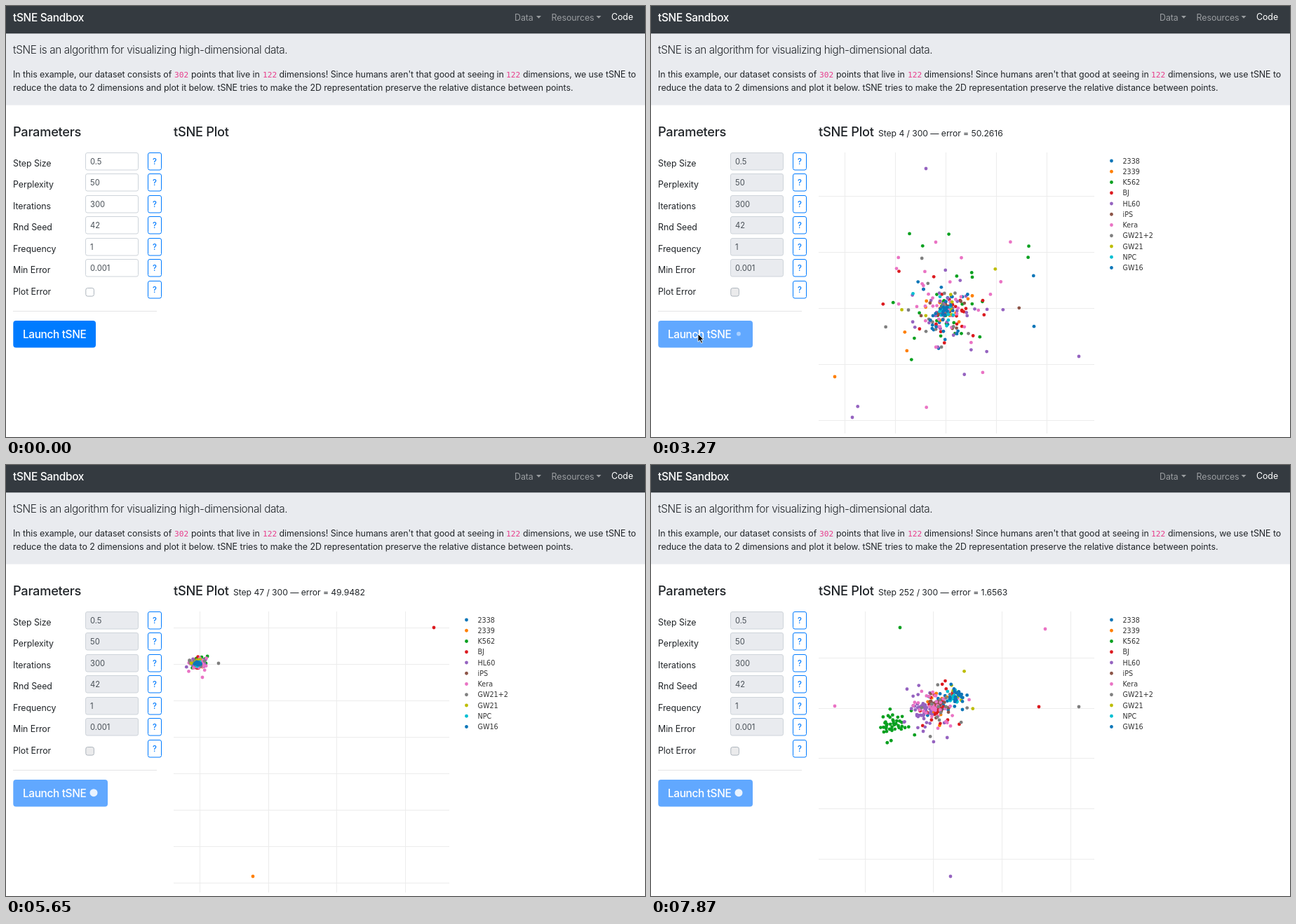
An HTML page that plays this animation: 911 by 615 pixels, repeating every 8 s.

```html
<!DOCTYPE html>
<html lang="en">
<head>
<meta charset="utf-8">
<title>tSNE Sandbox</title>
<style>
  html, body { margin: 0; width: 100%; height: 100%; overflow: hidden; background: #fff; }
  svg { display: block; }
  text { font: 400 12.4px Inter, sans-serif; letter-spacing: -.06px; fill: #212529; white-space: pre; }
  .brand { font-size: 15.4px; font-weight: 500; letter-spacing: -.3px; fill: #fff; }
  .nav { fill: #9a9da0; }
  .active { fill: #fff; }
  .lead { font-size: 15.3px; font-weight: 350; letter-spacing: -.36px; }
  .code { font: 11.2px "DejaVu Sans Mono", monospace; letter-spacing: 0; fill: #e83e8c; }
  .title { font-size: 18.3px; font-weight: 500; letter-spacing: -.3px; }
  .value { font-size: 11.2px; letter-spacing: 0; fill: #495057; }
  .help { font-size: 11.2px; font-weight: 500; fill: #007bff; text-anchor: middle; }
  .launch { font-size: 15.4px; font-weight: 500; letter-spacing: -.36px; fill: #fff; }
  .loading { font-size: 15.4px; letter-spacing: -.4px; }
  .status { font-size: 12.2px; }
  .legend { font: 9.6px "DejaVu Sans", sans-serif; letter-spacing: 0; fill: #333; }
</style>
</head>
<body>
<svg id="stage" width="911" height="615" viewBox="0 0 911 615"></svg>
<script>
const LOOP = 8000;
// spread: how far a group scatters; along: its place on the line of separated clusters
const GROUPS = [
  { name: '2338', color: '#0d76b8', size: 22, spread: .6, along: .75 },
  { name: '2339', color: '#ff7f00', size: 17, spread: 1, along: .7 },
  { name: 'K562', color: '#08a01f', size: 42, spread: 1, along: 0 },
  { name: 'BJ', color: '#dc1a1f', size: 37, spread: 1.1, along: .7 },
  { name: 'HL60', color: '#9563c0', size: 54, spread: 1, along: .45 },
  { name: 'iPS', color: '#8d5548', size: 24, spread: .6, along: .7 },
  { name: 'Kera', color: '#ea73c4', size: 40, spread: 1.3, along: .66 },
  { name: 'GW21+2', color: '#7f7f7f', size: 17, spread: 1.3, along: .8 },
  { name: 'GW21', color: '#bdbd00', size: 8, spread: .8, along: 1 },
  { name: 'NPC', color: '#00bfd2', size: 15, spread: .4, along: .95 },
  { name: 'GW16', color: '#0d76b8', size: 26, spread: .5, along: 1 }
];
const PARAMS = [['Step Size', '0.5'], ['Perplexity', '50'], ['Iterations', '300'], ['Rnd Seed', '42'],
  ['Frequency', '1'], ['Min Error', '0.001'], ['Plot Error']];

// ---- Random helpers ----
let seed = 42;
function random() {
  seed = (seed + 0x6D2B79F5) | 0;
  let r = Math.imul(seed ^ seed >>> 15, 1 | seed);
  r = r + Math.imul(r ^ r >>> 7, 61 | r) ^ r;
  return ((r ^ r >>> 14) >>> 0) / 4294967296;
}
function gauss() {
  const g = Math.sqrt(-2 * Math.log(random() + 1e-9)) * Math.cos(2 * Math.PI * random());
  return Math.max(-2.2, Math.min(2.2, g));
}
const lerp = (a, b, k) => a + (b - a) * k;
const soften = v => 165 * Math.tanh(v / 165);

// A cloud scatters every group around one centre; tail > 0 throws some points far out.
const cloud = (cx, cy, sx, sy, tail) => ({ spread }) => {
  const reach = spread * Math.exp(tail * gauss());
  return [cx + soften(sx * reach * gauss()), cy + soften(sy * reach * gauss())];
};
const separated = group =>
  cloud(lerp(347, 435, group.along), lerp(370, 331, group.along), 11, 11, .35)(group);

// The outermost points, which set the scale of the plot, are given as [group, x, y].
const layout = (scatter, outermost = []) => GROUPS.flatMap((group, g) => {
  const far = outermost.filter(point => point[0] === g).map(([, x, y]) => [x, y]);
  return Array.from({ length: group.size }, (_, i) => far[i] || scatter(group));
});

// grid: a vertical line, gap, a horizontal line, gap
const SCENES = [
  { tick: 7, step: 0, error: 50.2741, grid: [276, 72.2, 271, 80],
    points: layout(cloud(436, 410, 62, 68, 0)) },
  { tick: 11, step: 4, error: 50.2616, grid: [276, 72.2, 271, 80],
    points: layout(cloud(421, 433, 18, 18, 1), [[4, 392, 232], [4, 610, 500], [4, 287, 587], [1, 262, 529]]) },
  { tick: 20, step: 27, error: 49.9698, grid: [276.5, 58, 228, 65.9],
    points: layout(cloud(392, 559, 25, 5, .5), [[1, 390, 232], [1, 286, 587], [3, 597, 558], [6, 610, 582], [6, 262, 564]]) },
  { tick: 27, step: 47, error: 49.9482, grid: [276.5, 97.5, 232, 52],
    points: layout(cloud(274, 283, 4, 3, .3), [[1, 352, 587], [3, 610, 232], [6, 280, 303], [7, 303, 283]]) },
  { tick: 32, step: 61, error: 50.0016, grid: [314.5, 84.3, 228, 40.4],
    points: layout(cloud(313, 431, 4, 13, .6), [[1, 262, 399], [3, 610, 232], [6, 319, 587], [6, 313, 259], [7, 366, 425]]) },
  { tick: 42, step: 252, error: 1.6563, grid: [305, 97.8, 275.5, 71.7],
    points: layout(separated, [[2, 355, 232], [3, 553, 345], [4, 427, 587], [6, 562, 234], [6, 262, 344], [7, 610, 345]]) }
];

// ---- Page markup ----
const text = (x, y, content, cls = '') => `<text x="${x}" y="${y}" class="${cls}">${content}</text>`;
const caret = x => `<path d="M${x} 14h7l-3.5 3.8z" fill="#9a9da0"/>`;
const paramRow = ([name, value], i) => {
  const y = Math.floor(209 + 30.5 * i) + .5;
  const field = value
    ? `<rect class="field" x="113.5" y="${y}" width="75" height="24.5" rx="2.5" stroke="#ced4da"/>` +
      text(120, y + 16.8, value, 'value')
    : `<rect id="check" x="113.8" y="${y + 10}" width="11.6" height="11.6" rx="2.6" stroke="#adb5bd"/>`;
  return text(10, y + 19.5, name) + field +
    `<rect x="202.5" y="${y}" width="19" height="24.5" rx="2.5" fill="#fff" stroke="#007bff"/>` +
    text(212, y + 16.8, '?', 'help');
};
const legendRow = ({ name, color }, i) => {
  const y = 221 + 15.25 * i;
  return `<circle cx="656.5" cy="${y}" r="2.4" fill="${color}"/>` + text(672.5, y + 3.5, name, 'legend');
};
const dots = GROUPS.map(({ size, color }) =>
  `<circle class="dot" r="2.4" fill="${color}"/>`.repeat(size)).join('');

const $ = id => document.getElementById(id);
$('stage').innerHTML = `
  <rect y="39" width="911" height="102.5" fill="#e9ebef"/>
  <rect width="911" height="39.3" fill="#343a40"/>
  ${text(10, 21.5, 'tSNE Sandbox', 'brand')}
  ${text(725, 20.7, 'Data', 'nav')}${caret(756)}
  ${text(777.5, 20.7, 'Resources', 'nav')}${caret(841.5)}
  ${text(863, 20.2, 'Code', 'active')}
  ${text(10, 68, 'tSNE is an algorithm for visualizing high-dimensional data.', 'lead')}
  ${text(10, 101.7, 'In this example, our dataset consists of')}
  ${text(240, 101.7, '302', 'code')}
  ${text(264, 101.7, 'points that live in')}
  ${text(366, 101.7, '122', 'code')}
  ${text(389.5, 101.7, "dimensions! Since humans aren't that good at seeing in")}
  ${text(713, 101.7, '122', 'code')}
  ${text(737, 101.7, 'dimensions, we use tSNE to')}
  ${text(10, 121, 'reduce the data to 2 dimensions and plot it below. tSNE tries to make the 2D representation preserve the relative distance between points.')}
  ${text(10, 186, 'Parameters', 'title')}
  ${text(239, 186, 'tSNE Plot', 'title')}
  ${PARAMS.map(paramRow).join('')}
  <path d="M10 435.5H215" stroke="#e4e4e5"/>
  <rect id="button" x="10.3" y="449" height="38.5" rx="4"/>
  ${text(24, 474, 'Launch tSNE', 'launch')}
  <circle id="pulse" cx="125" cy="467.7" fill="#fff"/>
  <g id="loading">
    <circle id="spinner" cx="532" cy="222" r="11.2" fill="none" stroke="#007bff" stroke-width="3.2"
      pathLength="4" stroke-dasharray="3 1"/>
    ${text(551.5, 227, 'Loading...', 'loading')}
  </g>
  <g id="plot">
    <text id="status" class="status" x="324" y="186"></text>
    <path id="grid" fill="none" stroke="#ececec"/>
    ${dots}
    ${GROUPS.map(legendRow).join('')}
  </g>
  <path id="cursor" d="M0 0v11.2l2.6-2.4 2 4.4 2-.9-2-4.2h3.6z" fill="#000" stroke="#fff" stroke-width=".9"/>`;

const dotNodes = document.querySelectorAll('.dot');
const fieldNodes = document.querySelectorAll('.field');
const show = (id, visible) => $(id).setAttribute('visibility', visible ? 'visible' : 'hidden');
const setAttrs = (node, attrs) => {
  for (const name in attrs) node.setAttribute(name, attrs[name]);
};

function gridPath([x0, dx, y0, dy]) {
  const snap = v => Math.floor(v) + .5;
  let d = '';
  for (let x = x0 - dx * Math.floor((x0 - 239) / dx); x < 632; x += dx) d += `M${snap(x)} 209V610`;
  for (let y = y0 - dy * Math.floor((y0 - 209) / dy); y < 610; y += dy) d += `M239 ${snap(y)}H632`;
  return d;
}

function drawPlot(tick) {
  const last = SCENES.length - 1;
  const at = Math.min(tick, SCENES[last].tick);
  const i = Math.max(1, SCENES.findIndex(scene => at <= scene.tick));
  const from = SCENES[i - 1], to = SCENES[i];
  const k = (at - from.tick) / (to.tick - from.tick);
  const step = Math.round(lerp(from.step, to.step, k));
  let error = lerp(from.error, to.error, k);
  // The error drops once early exaggeration ends.
  if (i === last) error = step < 100 ? from.error - .05 * k : to.error + .5 * (1 - k) ** 2;
  $('status').textContent = `Step ${step} / 300 — error = ${error.toFixed(4)}`;
  $('grid').setAttribute('d', gridPath(from.grid.map((v, n) => lerp(v, to.grid[n], k))));
  dotNodes.forEach((dot, n) => {
    const [x0, y0] = from.points[n], [x1, y1] = to.points[n];
    setAttrs(dot, { cx: lerp(x0, x1, k), cy: lerp(y0, y1, k) });
  });
}

// Screen updates come about every 150 ms; tick 0 is the click on the button.
const tickAt = t => t < 4770
  ? Math.floor((t - 1620) / 150)
  : 21 + Math.floor((t - 4770) / 147.6 + .05);

function render(t) {
  const tick = tickAt(t);
  const running = tick >= 0;

  const move = [740, 890, 1030, 1180].filter(start => t >= start).length - 1;
  const ease = 1 - (1 - Math.max(0, move) / 3) ** 2;
  const x = 67 * ease, y = lerp(417, 468, ease);
  show('cursor', move >= 0 && tick < 17);
  $('cursor').setAttribute('transform', `translate(${x} ${y})`);

  const hover = move >= 0 && x > 10 && y > 449;
  const fill = tick > 0 ? '#61a8ff' : running ? '#5f9be4' : hover ? '#0069d9' : '#007bff';
  setAttrs($('button'), { width: running ? 134.7 : 117.7, fill });
  fieldNodes.forEach(field => field.setAttribute('fill', running ? '#e9ebef' : '#fff'));
  $('check').setAttribute('fill', tick > 0 ? '#ebebec' : '#fff');

  // Both spinners turn once in five ticks.
  const phase = Math.max(0, tick) % 5 / 5 + .03;
  const grow = Math.min(1, phase * 2);
  show('pulse', running);
  setAttrs($('pulse'), { r: 6.4 * grow, opacity: phase < .5 ? grow : 2 - 2 * phase });
  show('loading', running && tick < 7);
  $('spinner').setAttribute('transform', `rotate(${45 + 360 * phase} 532 222)`);

  show('plot', tick >= 7);
  if (tick >= 7) drawPlot(tick);
}

(function loop() {
  render(performance.now() % LOOP);
  requestAnimationFrame(loop);
})();
</script>
</body>
</html>
```
